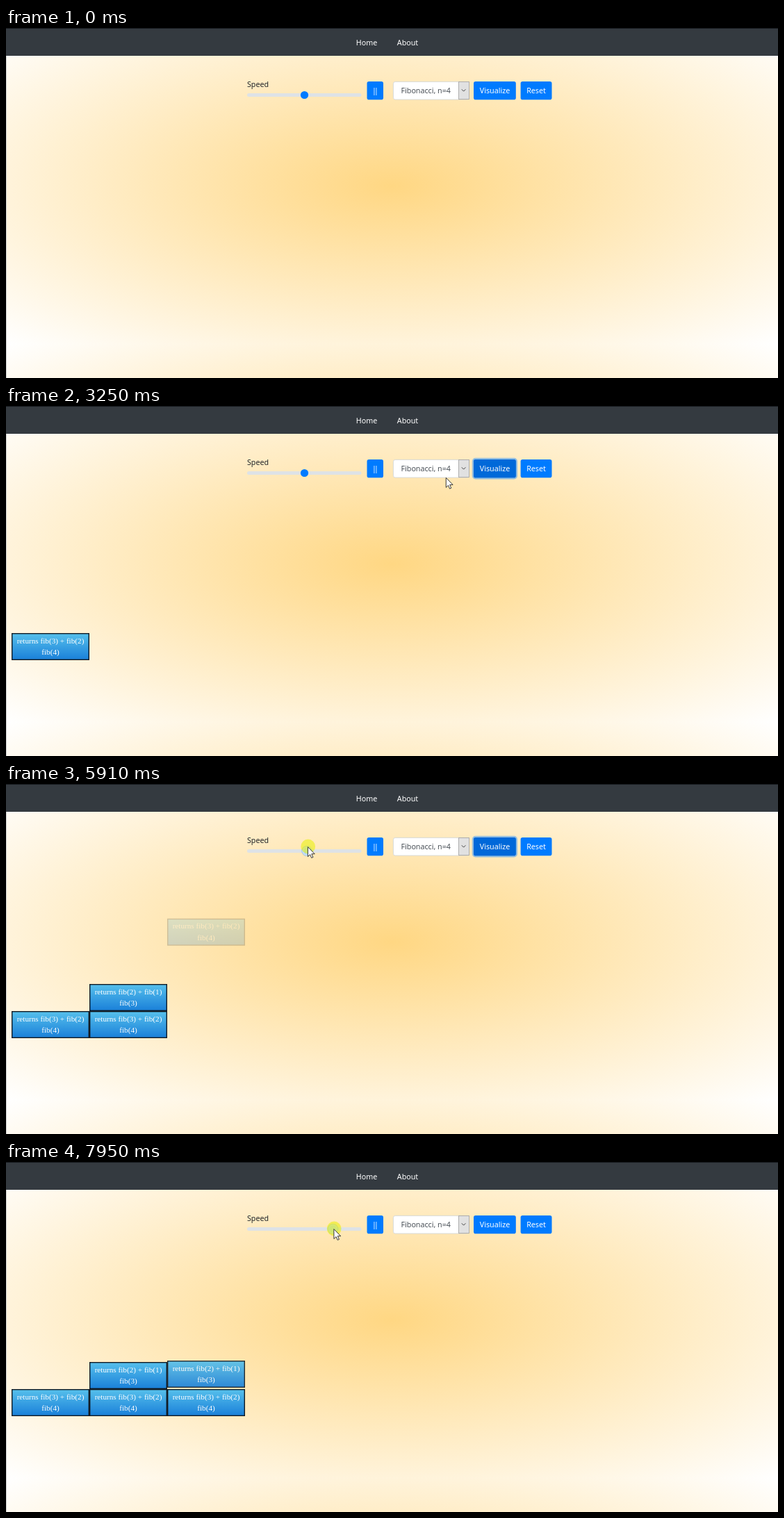
An HTML page that plays this animation: 1111x504 px, repeating every 8000 ms.

```html
<!DOCTYPE html>
<html lang="en">
<head>
<meta charset="utf-8">
<title>Recursion visualizer</title>
<style>
html, body { margin: 0; width: 100%; height: 100%; overflow: hidden; }
body { background: #fff radial-gradient(ellipse farthest-corner at center, #ffd783, #fff) 0 0 / 1111px 455px repeat-y; }
svg { display: block; width: 1111px; height: 504px; }
text { font: 10.7px "Noto Sans", "Open Sans", sans-serif; fill: #fff; text-anchor: middle; }
.dark { fill: #212529; text-anchor: start; }
.btn { fill: #007bff; }
.pause { letter-spacing: -2.9px; }
.block text { font: 11.2px "Liberation Serif", "Times New Roman", serif; }
</style>
</head>
<body>
<svg viewBox="0 0 1111 504">
  <defs>
    <linearGradient id="sky" x1="0" y1="0" x2="0" y2="1">
      <stop offset="0" stop-color="#56c0ec"/>
      <stop offset="1" stop-color="#1a80d9"/>
    </linearGradient>
  </defs>

  <rect width="1" height="504" fill="#d0d0d0"/>
  <rect width="1111" height="40" fill="#343a40"/>
  <rect width="1111" height="1" fill="#16191d"/>
  <text x="519" y="25">Home</text>
  <text x="578" y="25">About</text>

  <text class="dark" x="347" y="85">Speed</text>
  <rect x="347" y="94" width="164.5" height="5" rx="2.5" fill="#dee2e6"/>
  <g id="thumb">
    <circle id="halo" r="6.7" fill="#fff" stroke="#007bff" stroke-opacity=".25" stroke-width="2.2"/>
    <circle id="knob" r="5.6"/>
  </g>

  <rect class="btn" x="519.5" y="77" width="23.5" height="26.2" rx="2.8"/>
  <text class="pause" x="529.9" y="94.3">||</text>

  <rect x="557.4" y="77.4" width="109" height="25.6" rx="2.8" fill="#fff" stroke="#ced4da" stroke-width=".8"/>
  <rect x="651.5" y="77.5" width="15" height="25" fill="#e1e1e1" stroke="#adadad"/>
  <path d="M655.8 88.3l2.8 2.8 2.8-2.8" fill="none" stroke="#444"/>
  <text class="dark" x="568.5" y="94.4" style="fill:#495057">Fibonacci, n=4</text>

  <rect id="ring" x="671.9" y="75.9" width="63" height="28.4" rx="3.8" fill="none" stroke="#268fff" stroke-width="2.2"/>
  <rect class="btn" x="673" y="77" width="60.8" height="26.2" rx="2.8"/>
  <rect id="hover" x="673" y="77" width="60.8" height="26.2" rx="2.8" fill="#0069d9"/>
  <text x="703.5" y="94.4">Visualize</text>
  <rect class="btn" x="740.6" y="77" width="44.9" height="26.2" rx="2.8"/>
  <text x="763" y="94.4">Reset</text>

  <g id="blocks"></g>

  <g id="pointer">
    <circle id="click" cx=".7" r="10.4" fill="#e8f000" fill-opacity=".55"/>
    <g fill="#fff" stroke="#222" stroke-width=".9" stroke-linejoin="round">
      <path id="arrow" d="M.4.6V14.6L3.6 11.6 5.7 16.4 7.9 15.4 5.8 10.7H10.2Z"/>
      <path id="hand" d="M-1.4 9.6V1.6a1.4 1.4 0 0 1 2.8 0V6l4.6 1.1q2 .5 1.8 2.4l-.5 3.6-1.2 3.6H0L-4.4 10.6q-1-1.6.5-2.1 1.2-.2 2.5 1.1Z"/>
    </g>
  </g>
</svg>
<script>
const LOOP = 8000, STEP = 77.9, STEP_FROM = 842;
const HOVER = 1300, CLICK = 1660, PRESS = 5905, FALL = 650;
const $ = id => document.getElementById(id);
const clamp = v => Math.max(0, Math.min(1, v));
const ramp = (t, from) => clamp((t - from) / 150);
const show = (el, on) => { el.style.display = on ? '' : 'none'; };
const move = (el, x, y) => el.setAttribute('transform', `translate(${x} ${y})`);
const fade = (el, opacity) => el.setAttribute('opacity', opacity);

// each block lands on the next free place, alternating between two rows
const blocks = [2195, 3409, 4684, 5860, 7415].map((start, i) => {
  const row = i && i % 2 === 0 ? 1 : 0, n = 4 - row;
  const x = 8 + Math.ceil(i / 2) * 112, y = 327 - row * 39;
  $('blocks').insertAdjacentHTML('beforeend', `<g class="block">
    <rect x="${x + .7}" y="${y + .7}" width="110.6" height="37.6" fill="url(#sky)" stroke="#111b24" stroke-width="1.4"/>
    <text x="${x + 56}" y="${y + 14.5}">returns fib(${n - 1}) + fib(${n - 2})</text>
    <text x="${x + 56}" y="${y + 31.3}">fib(${n})</text></g>`);
  return { start, el: $('blocks').lastElementChild };
});

// pointer moves: departure, arrival, end point, height of the arc
const moves = [
  [120, 121, 962, 404], [220, 221, 945, 358], [540, 615, 794, 198],
  [800, 998, 690, 124], [1230, 1400, 693, 97], [2560, 3010, 639, 102],
  [3010, 3724, 613, 105], [3724, 4780, 434, 90, 33], [PRESS, 6900, 471.5, 96]
];

function tip(t) {
  let x = 962, y = 404;
  for (const [from, to, endX, endY, arc = 0] of moves) {
    const k = clamp((t - from) / (to - from));
    x += (endX - x) * k;
    y += (endY - y) * k - arc * Math.sin(Math.PI * k) ** 2;
  }
  return [x, y];
}

function draw(time) {
  // the screen is sampled at about 13 frames per second
  const t = time < STEP_FROM ? time
    : STEP_FROM + Math.floor((time - STEP_FROM) / STEP) * STEP;

  for (const { start, el } of blocks) {
    const age = t - start, landed = age > FALL;
    show(el, age > 0);
    fade(el, landed ? 1 : 1 - Math.exp(-age / 210));
    move(el, 0, landed ? 0 : -200 * Math.exp(-age / 112));
  }

  const [x, y] = tip(t), held = t >= PRESS;
  const onButton = x > 673 && x < 734 && y > 77 && y < 103;
  show($('pointer'), t >= 120);
  show($('hand'), onButton);
  show($('arrow'), !onButton);
  show($('click'), held || (t > CLICK && t < CLICK + 270));
  move($('pointer'), x, y);

  move($('thumb'), held ? Math.max(429.5, x - 1) : 429.5, 96.5);
  show($('halo'), held);
  $('knob').setAttribute('fill', held ? '#b3d7ff' : '#007bff');

  const blur = 1 - ramp(t, PRESS);
  fade($('hover'), ramp(t, HOVER) * blur);
  fade($('ring'), .5 * ramp(t, CLICK) * blur);
}

let origin;
function tick(now) {
  origin ??= now;
  draw((now - origin) % LOOP);
  requestAnimationFrame(tick);
}
draw(0);
requestAnimationFrame(tick);
</script>
</body>
</html>
```
